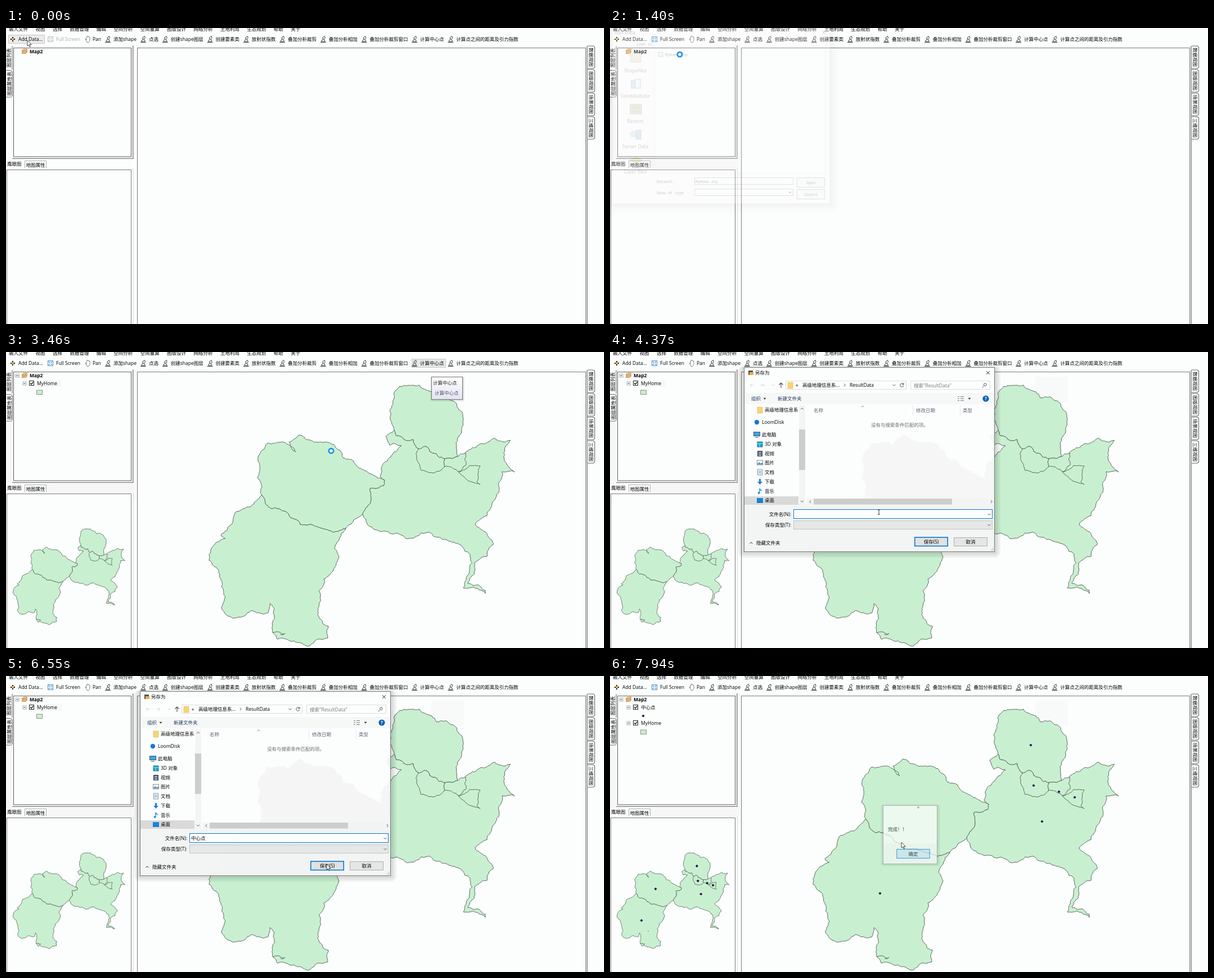
Animation, 1063 px wide and 527 px high, one loop 8 s. Source, as an HTML page:

```html
<!DOCTYPE html>
<html>
<head>
<meta charset="utf-8">
<title>Map centre points</title>
<style>
  html, body { margin: 0; width: 100%; height: 100%; overflow: hidden; background: #fcfefd; }
  svg { display: block; width: 1063px; height: 527px; }
  text { font: 8.5px "Open Sans", "Noto Sans CJK SC", "Noto Sans CJK", sans-serif; white-space: pre; }
  .mono { font: 6.7px "Liberation Mono", "Noto Sans CJK SC", monospace; }
  .bold { font-weight: 700; }
</style>
</head>
<body>
<svg id="stage" viewBox="0 0 1063 527"></svg>
<script>
const LOOP = 8000;
const PAPER = '#fcfefd', LAND = '#c8f0d0', BLUE = '#0078d7';

// ---- drawing helpers ----
const box = (x, y, w, h, fill = 'none', stroke = 'none', extra = '') =>
  `<rect x="${x}" y="${y}" width="${w}" height="${h}" fill="${fill}" stroke="${stroke}" ${extra}/>`;
const line = (d, stroke = '#555', width = 1, fill = 'none') =>
  `<path d="${d}" fill="${fill}" stroke="${stroke}" stroke-width="${width}"/>`;
const dot = (x, y, r, fill) => `<circle cx="${x}" cy="${y}" r="${r}" fill="${fill}"/>`;
const text = (x, mid, str, fill = '#000', extra = '') =>
  `<text x="${x}" y="${mid + 3}" fill="${fill}" ${extra}>${str}</text>`;
const centred = 'text-anchor="middle"';
const rightAligned = 'text-anchor="end"';
const group = (id, body, extra = '') => `<g id="${id}" ${extra}>${body}</g>`;
const chevron = (x, y, turn = 0, stroke = '#555') =>
  `<path d="M-2.5 -1.2L0 1.3L2.5 -1.2" transform="translate(${x} ${y}) rotate(${turn})" fill="none" stroke="${stroke}"/>`;
const triangle = (x, y) => line(`M${x - 2.5} ${y - 1.2}h5l-2.5 3z`, 'none', 0, '#333');
const cross = (x, y, r) => line(`M${x - r} ${y - r}l${2 * r} ${2 * r}m0 ${-2 * r}l${-2 * r} ${2 * r}`, '#222', 0.9);
const folder = (x, y) => box(x, y, 9, 11, '#f6d477', '#e3b84c', 'stroke-width=".6"');
const shadow = (x, y, w, h, spread) => [1, 2, 3].map(i => {
  const s = spread * i / 3;
  return box(x - s, y - s / 2, w + 2 * s, h + 1.5 * s, '#000', 'none', `rx="${s}" opacity=".05"`);
}).join('');

// ---- map: a few key points per border, roughened by midpoint displacement ----
const pts = s => s.split(' ').map(p => p.split(',').map(Number));
const noise = n => { const v = Math.sin(n * 12.9898) * 43758.5453; return (v - Math.floor(v)) * 2 - 1; };

function rough(a, b) {
  const dx = b[0] - a[0], dy = b[1] - a[1];
  if (Math.hypot(dx, dy) < 3.5) return [a];
  const k = noise(a[0] * 7 + a[1] * 13 + b[0] * 3 + b[1]) * 0.16;
  const mid = [(a[0] + b[0]) / 2 - dy * k, (a[1] + b[1]) / 2 + dx * k];
  return [...rough(a, mid), ...rough(mid, b)];
}
// Both neighbours of a shared border get the same line.
function edge(a, b) {
  const flip = a[0] > b[0] || (a[0] === b[0] && a[1] > b[1]);
  return flip ? [...rough(b, a).slice(1), a].reverse() : rough(a, b);
}
const region = ring => 'M' + ring.flatMap((p, i) => edge(p, ring[(i + 1) % ring.length]))
  .map(p => p.map(v => v.toFixed(1)).join(' ')).join('L') + 'Z';

const northBorder = pts('690,139 693,148 724,156 733,172');
const midBorder = pts('673,228 671,238 647,243 648,268 634,289');
const southBorder = pts('455,255 470,278 485,279 505,294 545,308 604,314');
const smallBorder = pts('733,172 746,168 764,181 780,190');
const back = border => [...border].reverse();

const shapes = [
  [...northBorder, ...pts('760,200 800,200 817,180 842,164 897,157 885,188 904,214 882,213 876,250 865,267 834,307 852,320 866,343 855,364 833,375 821,412 852,424 852,430 813,420 825,360 810,345 775,333 750,321 728,329 655,316 640,298'),
    ...back(midBorder), ...pts('665,220 678,194 703,167 682,166 675,150')],
  [...northBorder, ...smallBorder.slice(1), ...pts('803,186 800,162 812,125 804,100 795,87 765,82 757,71 735,59 700,61 688,93 683,118')],
  [...midBorder, [618, 299], ...back(southBorder), ...pts('455,240 447,224 449,196 465,162 492,160 515,178 503,160 520,148 573,161 600,189 618,194 651,218')],
  [...southBorder, ...pts('592,335 584,350 592,364 565,404 557,447 557,474 573,488 572,509 540,523 482,511 473,492 477,458 469,448 466,464 410,473 392,468 383,455 390,437 380,396 361,371 364,352 390,332 382,326 410,284 440,271')],
  [...smallBorder, ...pts('780,204 762,215 738,211 730,191')],
  pts('780,190 803,186 817,180 818,201 805,213 780,204'),
  pts('804,213 824,202 843,203 837,231 843,236 818,226'),
].map(region);
const mapBody = shapes.map(d => `<path d="${d}"/>`).join('') + '<path d="M474 500q10 -4 14 0t8 1q-3 4 -8 2" fill="none"/>';
const centres = pts('748,123 753,195 798,206 826,216 768,259 480,387 548,234');
const toOverview = ([x, y]) => [12 + (x - 360) * 0.367, 314.5 + (y - 58) * 0.367];
const diamond = ([x, y]) => `<path d="M${x} ${y - 2.6}l2.6 2.6l-2.6 2.6l-2.6 -2.6z" fill="#2b1050"/>`;

// ---- application window ----
const toolIcon = x => line(`M${x} 25.5h10M${x + 1.5} 24l3 -4.5l-.5 -2.5l3.5 -2.5l1 3l-2 2.5l2 4zM${x + 4} 19.5l2 1`, '#222', 0.9);
const labelWidth = s => s.includes('shape') ? 24 + (s.length - 5) * 8.45 : s.length * 8.45;
// Lays labels side by side from x.
const row = (x, gap, labels, draw) => labels.map(s => {
  const out = draw(x, s);
  x += labelWidth(s) + gap;
  return out;
}).join('');
const menu = row(5, 13.6, '输入文件 视图 选择 数据管理 编辑 空间分析 空间量算 图版设计 网络分析 土地利用 生态规划 帮助 关于'.split(' '),
  (x, s) => text(x, 2, s));
const tools = row(191, 22, '添加shape 点选 创建shape图层 创建要素类 放射状指数 叠加分析裁剪 叠加分析相加 叠加分析裁剪窗口 计算中心点 计算点之间的距离及引力指数'.split(' '),
  (x, s) => toolIcon(x - 15) + text(x, 20, s));
const handIcon = line('M141 19l2 2v-5h1.5v-1.5h1.5v1h1.5v1h1.5v6l-2 3h-3z', '#777', 0.9, '#fff');
const fullScreen = (icon, ink) => box(74.5, 15.5, 9, 9, '#fff', icon) + line('M76 17l6 6m0 -6l-6 6', icon, 1.6) +
  dot(79, 20, 1.6, '#fff') + text(89, 20, 'Full Screen', ink);
const toolbar = menu + line('M8 20h8M12 16v8', '#111', 2) + dot(12, 20, 2, '#f0b429') + text(22, 20, 'Add Data...') +
  handIcon + text(154, 20, 'Pan') + tools;

const turned = (x, y, deg, str) =>
  `<text transform="translate(${x} ${y}) rotate(${deg})" y="3" text-anchor="middle">${str}</text>`;
const rightTabs = ['数据视图', '图版视图', '场景视图', '三维视图'].map((s, i) => {
  const y = 32 + i * 42;
  return line(`M1034 ${y}h10l2.5 2v36l-2.5 2h-10`, '#666', 1.1) + turned(1040, y + 20, 90, s);
}).join('');
const frame = [
  line('M13.5 229V35.5H222.5V229H13.5M226 31V232.5H11', '#666', 1.1),
  line('M224.5 32V230.5H12M223.5 250.5h3V527', '#ddd'),
  line('M1.5 527V252.5H222.5V527M233.5 527V35.5H1030.5V527', '#777'),
  line('M1033 32V527', '#777', 1.4),
  line('M0 75.5h8l3.5 2V121l-2.5 2H0M11 32v42', '#666'),
  line('M33.5 249V236.5H71.5V249', '#aaa'),
  turned(5, 53, -90, '图层列表'), turned(5.5, 99, -90, '图层属性表'),
  text(2, 242, '鹰眼图'), text(35.5, 243.5, '地图属性'), rightTabs,
].join('');

const expander = (x, y) => box(x - 3, y - 3, 6, 6, '#fff', '#999', 'stroke-width=".8"') + line(`M${x - 1.7} ${y}h3.4`, '#222', 0.9);
const treeRow = (y, str) => expander(33, y) + box(41.5, y - 4.5, 8, 8, '#fff', '#222') +
  line(`M43 ${y - 0.5}l2 2l3.5 -4`, '#111', 1.3) + text(55, y, str);
const swatch = y => box(54.5, y, 10, 7.5, LAND, '#777', 'stroke-width=".8"');
const root = [0, 2.5, 5].map(d => line(`M28 ${45.5 - d}l3 -3h7l-3 3z`, '#b9762c', 0.8, '#f3c888')).join('') +
  text(42, 42, 'Map2', '#000', 'class="bold"');
const tooltip = shadow(757, 45, 55, 40, 3) + box(756.5, 44.5, 55, 40, 'url(#tip)', '#777') +
  text(759, 55, '计算中心点', '#222') + text(762, 73, '计算中心点', '#50506a');

// ---- add-data dialog ----
const placeIcons = [
  box(36, 46, 19, 15, '#d9d0a0', '#aaa'),
  box(38, 93, 9, 14, '#a9bed2', '#789') + box(45, 91, 9, 16, '#e6eef5', '#789'),
  box(36, 136, 20, 17, '#c2bf7c', '#888') + line('M36 142h20m0 6h-20M41 136v17m5 0v-17m5 0v17', '#888', 0.8),
  dot(41, 189, 6, '#b9cbd6') + box(46, 182, 9, 16, '#9db7ce', '#789'),
  line('M36 235l10 -5l11 5l-11 5z', '#a88', 1, '#e2c860'),
].join('');
const mono = (x, y, s) => text(x, y, s, '#222', 'class="mono"');
const field = (y, label, value) => mono(83, y, label) + box(150.5, y - 6.5, 175, 12, PAPER, '#888') + mono(152, y, value);
const plainButton = (y, label) => box(332.5, y - 8.5, 49, 17, '#f3f4f3', '#888') + text(357, y, label, '#222', centred + ' class="mono"');
const addDialog = [
  shadow(4, -2, 387, 315, 16), box(4, -2, 387, 315, '#f8f9f8', '#bbb'),
  text(8, 8, 'Add Data', '#333'), cross(380, 8, 3), mono(47, 28, 'Look in:'),
  box(79.5, 38.5, 303, 220, '#fff', '#ddd'), box(86, 43, 8, 8, LAND, '#777'), mono(98, 47, 'MyHome.shp'), placeIcons,
  ['Shapefiles', 'Geodatabase', 'Rasters', 'Server Data', 'Layer files'].map((s, i) => text(45, 76 + 45 * i, s, '#444', centred)).join(''),
  field(273, 'Dataset:', 'MyHome.shp'), field(293, 'Show of type', ''), triangle(320, 293),
  plainButton(275, 'Open'), plainButton(296, 'Cancel'),
].join('');

// ---- save dialog ----
const drives = [
  ['3D 对象', y => box(262, y - 4, 9, 9, '#19a0c4', '#0d7f9f') + line(`M262 ${y - 1}h9M266 ${y - 1}v6`, '#bdeaf5', 0.9)],
  ['视频', y => box(262, y - 5, 9, 10, '#4a515b') + box(264, y - 3, 5, 3, '#9ab') + box(264, y + 1, 5, 3, '#9ab')],
  ['图片', y => box(261.5, y - 4, 10, 8, '#fff', '#888') + line(`M262 ${y + 3}l3 -4l3 3l2 -2l2 3z`, '#3f87b5', 0.5, '#5b9bc8')],
  ['文档', y => box(262.5, y - 5, 8, 10, '#fff', '#7893a8') + line(`M264 ${y - 2}h5m-5 2h5m-5 2h5`, '#3f87b5', 0.8)],
  ['下载', y => line(`M265 ${y - 5}h3v5h3l-4.5 5l-4.5 -5h3z`, 'none', 0, '#1f7fd6')],
  ['音乐', y => line(`M266 ${y + 3}v-8q1 3 4 4`, '#1f8fe0', 1.4) + dot(264.5, y + 3, 1.9, '#1f8fe0')],
  ['桌面', y => box(261, y - 4, 11, 7, '#1486e0') + box(261, y + 3, 11, 1.5, '#0b5fa8')],
];
const navTree = folder(262, 98) + text(275, 103, '高级地理信息系统') +
  dot(261, 125, 4.2, '#1478d4') + text(270, 125, 'LoomDisk') +
  box(255.5, 142.5, 11, 7, '#3aa5e6', '#456') + line('M258 152h6', '#456') + text(270, 147, '此电脑') +
  box(239, 257, 96, 15, '#d9d9d9') +
  drives.map(([s, glyph], i) => { const y = Math.round(164 + i * 16.7); return glyph(y) + text(275, y, s); }).join('');

const heading = (x, s) => text(x, 104, s, '#5a6478');
const saveDialog = [
  shadow(238, 29, 446, 327, 10), box(238.5, 27.5, 445, 328, PAPER, '#777'),
  box(246, 33, 8, 8, '#555') + box(248, 36, 7, 5, '#f0b040') + text(258, 37, '另存为'), cross(672, 37, 3),
  line('M256 59h-7m3 -3l-3 3l3 3M267 59h7m-3 -3l3 3l-3 3', '#d5d5d5'), chevron(290, 59, 0, '#ccc'),
  line('M304 64v-9m-3.5 3.5l3.5 -3.5l3.5 3.5', '#444', 1.1),
  box(312.5, 51.5, 214, 15, 'none', '#ddd'), folder(316, 54), text(330, 58.5, '«'),
  text(342, 59, '高级地理信息系...'), chevron(417, 59, -90), text(426, 59, 'ResultData'), chevron(505, 59),
  line('M521.5 57a3.2 3.2 0 1 0 .5 3M522 55v3h-3', '#444'),
  box(534.5, 51.5, 141, 15, 'none', '#ddd'), text(540, 59.5, '搜索"ResultData"', '#777'),
  line('M664.5 60.5l-3 3M664.5 58a2.3 2.3 0 1 0 4.6 0a2.3 2.3 0 1 0 -4.6 0', '#555'),
  box(239, 73, 444, 20, '#f6f8f8'), text(251, 83, '组织', '#1e395b'), triangle(275, 83), text(298, 83, '新建文件夹', '#1e395b'),
  line('M618 79.5h3m2 0h6M618 83h3m2 0h6M618 86.5h3m2 0h6', '#777', 1.2), triangle(639, 83),
  dot(668, 83, 5.6, '#0a62b8'), text(668, 83, '?', '#fff', centred + ' class="bold"'),
  `<g clip-path="url(#listClip)" fill="#f5f6f5">${shapes.map(d => `<path d="${d}"/>`).join('')}</g>`,
  `<g clip-path="url(#navClip)">${navTree}</g>`,
  box(336, 95, 11, 177, '#f3f4f4'), chevron(341.5, 101, 180), chevron(341.5, 266), box(336, 138, 11, 72, '#cdcdcd'),
  heading(362, '名称'), heading(544, '修改日期'), heading(627, '类型'),
  chevron(449, 97, 180, '#888'), line('M538.5 95v18M622.5 95v18', '#e6e6e6'),
  text(515, 130, '没有与搜索条件匹配的项。', '#6a6a6a', centred),
  box(350, 261, 333, 11, '#f3f4f4'), chevron(356, 266.5, 90), box(362, 261, 246, 10.5, '#cdcdcd'), chevron(678, 266.5, -90),
  box(239, 272, 444, 83, '#f3f4f4'),
  text(322, 289, '文件名(N):', '#000', rightAligned), text(322, 308, '保存类型(T):', '#000', rightAligned),
  box(326.5, 280.5, 353, 16, PAPER, BLUE), chevron(674, 289),
  box(326.5, 300.5, 353, 15, '#e6e7e7', '#c4c4c4'), chevron(674, 308),
  group('imeTrace', box(328, 301, 316, 14, '#dddede') + box(328, 316, 316, 17, '#eff0f0')),
  chevron(251, 340, 180, '#222'), text(260, 340, '隐藏文件夹'),
  box(541.75, 330, 58.5, 15.5, '#e1e1e1', BLUE, 'stroke-width="1.6"'), text(571, 338, '保存(S)', '#000', centred),
  box(611.5, 330.5, 59, 15, '#e6e6e6', '#adadad'), text(641, 338, '取消', '#000', centred),
  line('M682 348l-5 6M682 351l-2.5 3', '#bbb'),
  group('caret', line('M329.5 283v11', '#111')), group('fileName', text(329, 289, '中心点')),
].join('');

const ime = box(328.5, 296.5, 0, 36, '#fff', '#b9c4d0', 'id="imeBox"') +
  text(333, 303, '', '#222', 'id="imeKeys"') + text(333, 323, '', '#333', 'id="imeWords"');

const messageBox = [
  shadow(486, 231, 96, 103, 5), box(485.5, 230.5, 96, 104, PAPER, '#999'), box(486, 298, 95, 36, '#f5f6f5'),
  group('closeMark', cross(570, 239, 3.3)), text(494, 273, '完成！！'),
  box(509.75, 308.5, 58.5, 16, '#e1e1e1', BLUE, 'id="okFace" stroke-width="1.5"'), text(539, 316.5, '确定', '#000', centred),
].join('');

const stage = document.getElementById('stage');
stage.innerHTML = `<defs>
  <linearGradient id="tip" x2="0" y2="1"><stop stop-color="#fff"/><stop offset="1" stop-color="#e2e4f0"/></linearGradient>
  <clipPath id="listClip">${box(350, 110, 333, 151)}</clipPath><clipPath id="navClip">${box(239, 95, 96, 177)}</clipPath></defs>` + [
  box(0, 0, 1063, 527, PAPER),
  group('chrome', box(72, 235, 156, 14, '#f5f6f5') + box(0, 124, 10, 110, '#f5f6f5') + box(227, 31, 5, 234, '#f8f9f8')),
  group('tipTrace', box(756, 44, 58, 44, '#f8faf9')),
  group('addHover', box(4.5, 12.5, 64, 15, '#eaebea', '#c4c4c4')),
  group('toolHover', box(721.5, 12.5, 60, 15, '#e6e7e7', '#c8c8c8')),
  toolbar, group('screenOff', fullScreen('#bbb', '#aaa')), group('screenOn', fullScreen('#4a90c8')),
  frame, root,
  group('oneLayer', expander(20, 42) + box(53, 50, 46, 12, '#f6f8f7') + treeRow(56, 'MyHome') + swatch(68)),
  group('twoLayers', expander(20, 42) + treeRow(56, '中心点') + diamond([59, 71]) + treeRow(84, 'MyHome') + swatch(96)),
  group('map', mapBody + `<g transform="translate(${toOverview([0, 0])}) scale(.367)" stroke-width="2.5">${mapBody}</g>`,
    `fill="${LAND}" stroke="#5d655f"`),
  group('centres', [...centres, ...centres.map(toOverview)].map(diamond).join('') + dot(68, 454, 0.7, '#444')),
  group('tooltip', tooltip), group('addDialog', addDialog), group('saveDialog', saveDialog), group('ime', ime), group('message', messageBox),
  group('arrow', line('M0 0V10L2.3 8L4 11.6L5.5 11L3.9 7.5H7.2Z', '#222', 0.8, '#fff')),
  group('busy', '<circle r="4.2" fill="#fff" stroke="#1e90e8" stroke-width="2.7"/>'),
  group('beam', line('M-2 -4h1.6l.4 .4l.4 -.4h1.6M0 -4v8M-2 4h4', '#222', 0.9)),
].join('');

// ---- timeline: when each part shows, with optional fades ----
const clamp = v => Math.min(1, Math.max(0, v));
const show = (from, to, fadeIn = 0, fadeOut = 0) => t =>
  t < from || t >= to + fadeOut ? 0 : Math.min(fadeIn ? clamp((t - from) / fadeIn) : 1, fadeOut ? clamp(1 - (t - to) / fadeOut) : 1);
const any = (...parts) => t => Math.max(...parts.map(p => p(t)));

const visible = {
  chrome: show(240, LOOP), tipTrace: show(3680, LOOP),
  addHover: show(0, 850), toolHover: show(2900, 3600),
  screenOff: show(0, 1200), screenOn: show(1200, LOOP),
  oneLayer: show(1560, 6700), twoLayers: show(6700, LOOP),
  map: show(1560, LOOP), centres: show(6700, LOOP),
  addDialog: show(80, 1230, 160, 220), tooltip: show(3000, 3530, 150, 150),
  saveDialog: show(3530, 6550, 230, 150), message: show(6780, 7800, 120, 480),
  caret: show(4220, 4300), ime: show(5000, 5710), imeTrace: show(5710, 6470), fileName: show(5790, LOOP),
  closeMark: show(0, 7860),
  arrow: any(show(0, 1230), show(1790, 3370), show(6000, LOOP)),
  busy: any(show(1230, 1790), show(3370, 3920)), beam: show(3920, 6000),
};

// Pointer moves: start, end, then the place reached.
const moves = [[0, 0, 38, 22], [80, 700, 124, 47], [1440, 1720, 82, 61], [1960, 2050, 50, 50], [2050, 2750, 810, 46], [2820, 2960, 756, 22],
  [3370, 3460, 578, 176], [3620, 4140, 496, 285], [4220, 4370, 478, 285], [5790, 6390, 570, 335], [6630, 6950, 520, 252], [6950, 7330, 518, 296]];
function pointerAt(t) {
  let [, , x, y] = moves[0];
  for (const [from, to, toX, toY] of moves.slice(1)) {
    const k = clamp((t - from) / (to - from));
    x += (toX - x) * k;
    y += (toY - y) * k;
  }
  return [x, y];
}

const el = id => document.getElementById(id);
const parts = Object.entries(visible).map(([id, level]) => [el(id), level]);
const cursors = ['arrow', 'busy', 'beam'].map(el);
const words = ['中心点', '中心', '忠心', '衷心', '重心', '中'];

function render(t) {
  for (const [node, level] of parts) {
    node.setAttribute('opacity', level(t));
    node.style.display = level(t) > 0 ? '' : 'none';
  }
  cursors.forEach(c => c.setAttribute('transform', `translate(${pointerAt(t)})`));

  // The candidate window grows as letters are typed.
  const typed = Math.max(0, t - 5000), growth = Math.min(2, Math.floor(typed / 230));
  el('imeBox').setAttribute('width', 203 + 56 * growth);
  el('imeKeys').textContent = "zhong'xin'dian".slice(0, 7 + Math.floor(typed / 77));
  el('imeWords').textContent = words.slice(0, 4 + growth).map((w, i) => `${i + 1}.${w}`).join('  ');

  el('okFace').setAttribute('fill', t < 7400 ? '#e1e1e1' : t < 7480 ? '#e5f1fb' : '#cce4f7');
  el('okFace').setAttribute('stroke-width', t < 7860 ? 1.5 : 1);
}

const start = performance.now();
function tick() {
  render((performance.now() - start) % LOOP);
  requestAnimationFrame(tick);
}
tick();
</script>
</body>
</html>
```
